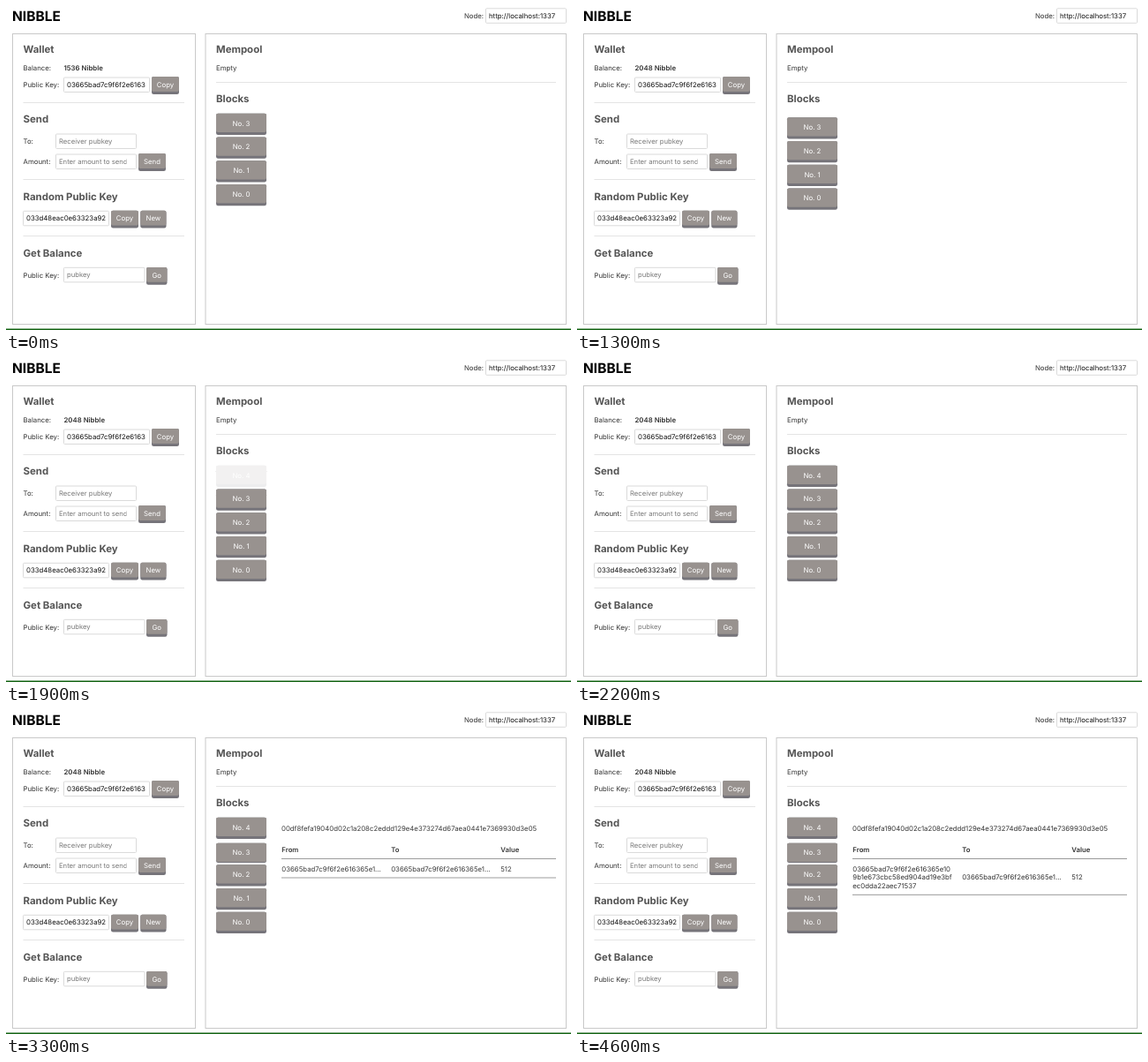
An HTML page that plays this animation: 640x367 px, repeating every 4.8 s.

```html
<!DOCTYPE html>
<html lang="en">
<head>
<meta charset="utf-8">
<title>Nibble wallet</title>
<style>
  html, body { margin: 0; width: 100%; height: 100%; overflow: hidden; background: #fff; }
  svg { display: block; }
  text { font: 7.8px Inter, "Open Sans", sans-serif; fill: #333; text-rendering: geometricPrecision; white-space: pre; }
  .title { font-size: 15.5px; font-weight: 700; fill: #000; }
  .head { font-size: 11.45px; font-weight: 700; fill: #555; }
  .bold { font-weight: 600; }
  .value { fill: #111; }
  .hint { font-size: 7.7px; fill: #777; }
  .label { fill: #fff; text-anchor: middle; }
  .end { text-anchor: end; }
  .panel { fill: none; stroke: #c9c9c9; }
  .input { fill: #fff; stroke: #dadada; }
  .rule { stroke: #e4e4e4; }
  .line { stroke: #999; }
  .shade { fill: #76747a; }
  .face { fill: #98928f; }
</style>
</head>
<body>
<svg id="stage" width="640" height="367" viewBox="0 0 640 367"></svg>
<script>
const LOOP = 4800, PITCH = 26.75;
const KEY = '03665bad7c9f6f2e616365e109b1e673cbc58ed904ad19e3bfec0dda22aec71537';
const stage = document.getElementById('stage');

function add(parent, tag, attrs = {}, content = '') {
  const el = document.createElementNS('http://www.w3.org/2000/svg', tag);
  for (const k in attrs) el.setAttribute(k, attrs[k]);
  el.textContent = content;
  return parent.appendChild(el);
}
const group = (parent = stage) => add(parent, 'g');
const text = (s, x, y, cls = '', parent = stage) => add(parent, 'text', { x, y, class: cls }, s);
const rule = (x1, x2, y, cls = 'rule', parent = stage) =>
  add(parent, 'line', { x1, x2, y1: y, y2: y, class: cls });
const box = (x, y, width, height, cls, rx = 0, parent = stage) =>
  add(parent, 'rect', { x, y, width, height, class: cls, rx });

function input(x, y, w, s, cls = 'value', clip = w - 7) {
  box(x, y, w, 16.5, 'input', 1);
  const view = add(stage, 'svg', { x: x + 3.5, y, width: clip, height: 17, overflow: 'hidden' });
  text(s, 0, 11, cls, view);
}

function button(x, y, w, h, s, parent = stage) {
  const g = group(parent);
  const shade = box(x, y, w, h, 'shade', 2.2, g);
  box(x, y, w, h - 3, 'face', 2, g);
  text(s, x + w / 2, y + (h - 3) / 2 + 3.1, 'label', g);
  return { g, shade };
}

// Header, panels and the bottom strip
text('NIBBLE', 7, 17, 'title');
text('Node:', 541, 13.9, 'end');
input(543.5, 2.8, 91, 'http://localhost:1337');
box(7.5, 31.5, 207, 329, 'panel');
box(226, 31.5, 408.5, 329, 'panel');
add(stage, 'rect', { x: 0, y: 365.5, width: 640, height: 1.5, fill: '#126312' });

// Left column
text('Wallet', 19.5, 52.7, 'head');
text('Balance:', 19.5, 72.8);
const balance = text('', 65.5, 72.8, 'bold');
text('Public Key:', 19.5, 92);
input(65.5, 81, 97, KEY.slice(0, 20), 'value', 90);
button(165, 80, 31, 20, 'Copy');
rule(19.5, 202, 109.5);

text('Send', 19.5, 132.4, 'head');
text('To:', 19.5, 156.3);
input(56.5, 145, 91, 'Receiver pubkey', 'hint');
text('Amount:', 19.5, 179.2);
input(56.5, 168, 91, 'Enter amount to send', 'hint', 76.5);
button(150, 167, 31, 20, 'Send');
rule(19.5, 202, 196.5);

text('Random Public Key', 19.5, 219.6, 'head');
input(19.5, 232.3, 97, '033d48eac0e63323a92', 'value', 90);
button(119, 231.7, 31, 19.8, 'Copy');
button(152.3, 231.7, 29.2, 19.8, 'New');
rule(19.5, 202, 260.5);

text('Get Balance', 19.5, 283.6, 'head');
text('Public Key:', 19.5, 307.8);
input(65.5, 296.3, 91.5, 'pubkey', 'hint');
button(159, 296, 23.5, 19.8, 'Go');

// Right column
text('Mempool', 238, 52.7, 'head');
text('Empty', 238, 72.8);
rule(238, 623, 86.5);
text('Blocks', 238, 109.2, 'head');

const stack = group();
const blocks = [3, 2, 1, 0].map((n, i) =>
  button(238, 121.8 + i * PITCH, 57, 24.2, 'No. ' + n, stack));
const chosen = blocks[0];
const newest = button(238, 121.8, 57, 24.2, 'No. 4');

// Details of the chosen block
const detail = group();
text('00df8fefa19040d02c1a208c2eddd129e4e373274d67aea0441e7369930d3e05', 312, 137.3, '', detail);
['From', 'To', 'Value'].forEach((s, i) => text(s, 312.3 + i * 124, 160.8, 'bold', detail));
rule(312, 623, 168.5, 'line', detail);
const short = KEY.slice(0, 24) + '...';
const closedKey = text(short, 312.3, 182.8, '', detail);
const openKey = group(detail);
[[0, 25], [25, 50], [50]].forEach((r, i) =>
  text(KEY.slice(...r), 312.3, 182.8 + i * 9.6, '', openKey));
const cells = group(detail);
text(short, 436.2, 182.8, '', cells);
text('512', 560.2, 182.8, '', cells);
const tableEnd = rule(312, 623, 190, 'line', detail);

// Each track lists [time, value]; a value holds until the next step
const tracks = {
  balance: [[0, 1536], [1300, 2048]],
  slide: [[0, 0], [1300, 4.5], [1400, 19.5], [1500, PITCH]],
  newest: [[0, 0], [1900, 0.12], [2100, 0.7], [2200, 1]],
  press: [[0, 0], [3100, 2.2]],
  shade: [[0, 24.2], [3200, 22.2]],
  detail: [[0, 0], [3200, 0.5], [3300, 0.96], [3400, 1]],
  open: [[0, 0], [4000, 1]]
};
const at = (name, t) => tracks[name].filter(s => s[0] <= t).pop()[1];
const move = (el, y) => el.setAttribute('transform', `translate(0 ${y})`);
const fade = (el, v) => el.setAttribute('opacity', v);

function draw(t) {
  balance.textContent = at('balance', t) + ' Nibble';
  move(stack, at('slide', t));
  move(chosen.g, at('press', t));
  chosen.shade.setAttribute('height', at('shade', t));
  fade(newest.g, at('newest', t));
  fade(detail, at('detail', t));
  const open = at('open', t);
  fade(openKey, open);
  fade(closedKey, 1 - open);
  move(cells, open * 9.6);
  move(tableEnd, open * 19.3);
}

const start = performance.now();
function tick() {
  draw((performance.now() - start) % LOOP);
  requestAnimationFrame(tick);
}
tick();
</script>
</body>
</html>
```
